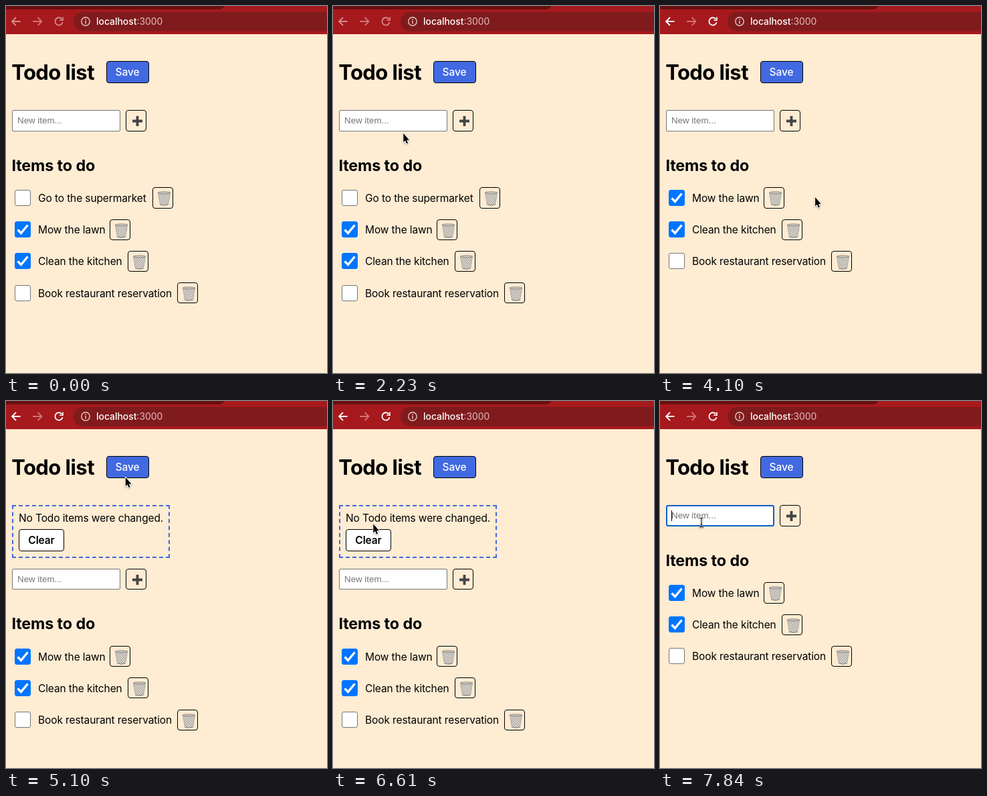
An HTML page that plays this animation: 480x547 px, repeating every 8000 ms.

```html
<!DOCTYPE html>
<html lang="en">
<head>
<meta charset="utf-8">
<title>Todo list</title>
<style>
  html, body { margin: 0; width: 100%; height: 100%; overflow: hidden; background: #feecd3; }
  svg { display: block; width: 480px; height: 547px; }
  text { font: 400 15.5px Inter, "Open Sans", sans-serif; letter-spacing: -.11px; white-space: pre; }
  .h1 { font-size: 31px; font-weight: 700; letter-spacing: -.55px; }
  .h2 { font-size: 23.3px; font-weight: 700; }
  .save { font-weight: 500; fill: #fff; }
  .clear { font-weight: 600; }
  .url { font-size: 13.9px; fill: #dfbcbd; letter-spacing: 0; }
  .host { fill: #fff; font-weight: 500; }
  .hint { font: 13.333px "Liberation Sans", Arial, sans-serif; letter-spacing: 0; fill: #757575; }
  .mid { text-anchor: middle; }
  #cursor { filter: drop-shadow(0 1px 1px rgba(0, 0, 0, .3)); }
</style>
</head>
<body>
<svg viewBox="0 0 480 547">
  <defs>
    <pattern id="mesh" width="3.4" height="3.8" patternUnits="userSpaceOnUse">
      <rect width="4" height="4" fill="#e3ddd3"/>
      <path d="M0 0L3.4 3.8M3.4 0L0 3.8" stroke="#9b9895" stroke-width=".7"/>
    </pattern>
    <g id="bin">
      <path d="M1 2.5L4 20Q10 22.3 16 20L19 2.5Z" fill="url(#mesh)" stroke="#a19e9a" stroke-width=".8"/>
      <path d="M4 20Q10 22.2 16 20" fill="none" stroke="#85817d"/>
      <ellipse cx="10" cy="2.4" rx="9.4" ry="1.5" fill="#cfcac2" stroke="#827f7b" stroke-width=".9"/>
    </g>
    <path id="caret" d="M-3 -7Q0 -7 0 -5Q0 -7 3 -7M0 -5V5M-3 7Q0 7 0 5Q0 7 3 7M-1.5 3H1.5"/>
  </defs>

  <rect width="480" height="547" fill="#feecd3"/>
  <rect width="480" height="42" fill="#a6191d"/>
  <path d="M0 0H326Q325 5 317 5H0Z" fill="#68100f"/>
  <rect x="101" y="9" width="420" height="28.5" rx="14.25" fill="#801b1d"/>
  <g fill="none" stroke-width="1.8">
    <path class="nav" d="M21.5 23H9.5M15 17L9 23L15 29"/>
    <path d="M40 23H53M47.5 17L53.5 23L47.5 29" stroke="#d17375"/>
    <path class="nav" d="M83.6 19.5A5.7 5.7 0 1 0 84.6 24.3"/>
    <path class="nav" d="M85 16.5V21.2H80.2" stroke-width="1.6"/>
    <circle cx="119" cy="23" r="6.2" stroke="#e3c6c7" stroke-width="1.4"/>
    <path d="M119 22V26.4M119 19.3V20.9" stroke="#e3c6c7" stroke-width="1.5"/>
  </g>
  <text class="url" x="135" y="28"><tspan class="host">localhost</tspan>:3000</text>

  <text class="h1" x="8.2" y="110">Todo list</text>
  <g id="page"></g>

  <g id="cursor">
    <path id="arrow" d="M.3 -.8V12.6L3.1 9.9L5 14.6L7.1 13.7L5.2 9.2H9Z" stroke="#fff" stroke-width="1.8" paint-order="stroke" stroke-linejoin="round"/>
    <path id="hand" transform="translate(0 -.8) scale(.93)" d="M-1.5 1Q0 -.9 1.5 1L2.2 6Q3.5 4.9 5 6.3Q6.4 5.4 7.6 6.9Q9.6 6.4 9.9 8.6Q10.3 12 8.4 14.2V16.6H1V15Q-.8 12.7 -3.4 9.8Q-4.3 8.3 -2.6 7.8Q-1.3 7.7 -.2 9.3ZM3 11V14M5 11V14M7 11V14" fill="#fff" stroke="#000" stroke-width="1.2" stroke-linejoin="round"/>
    <g id="beam" fill="none">
      <use href="#caret" stroke="#fff" stroke-width="2.6"/>
      <use href="#caret" stroke="#111" stroke-width="1.1"/>
    </g>
  </g>
</svg>
<script>
const LOOP = 8000, STEP = 58;
const AT = { active: 3100, remove: 3800, message: 4870, clear: 7090, focus: 7780 };
const BLUE = '#4169e1';

// label, x of its delete button, checked
const ITEMS = [
  ['Go to the supermarket', 219, false],
  ['Mow the lawn', 155, true],
  ['Clean the kitchen', 182, true],
  ['Book restaurant reservation', 256, false]
];

const slowDown = p => 1 - (1 - p) ** 2;
// above 1/2π it backs up first and overshoots at the end
const swing = k => p => p - k * Math.sin(2 * Math.PI * p);

const moves = [];
let rest = [470, 505];

function glide(start, end, to, ease = swing(.155)) {
  const from = rest;
  moves.push({ start, end, at: p => from.map((v, i) => v + (to[i] - v) * ease(p)) });
  rest = to;
}

// clockwise around an ellipse, angles counted from the top
function orbit(start, end, [cx, cy], [rx, ry], a0, a1) {
  const at = p => {
    const a = a0 + (a1 - a0) * p;
    return [cx + rx * Math.sin(a), cy - ry * Math.cos(a)];
  };
  moves.push({ start, end, at });
  rest = at(1);
}

glide(1440, 2230, [105, 190.5], slowDown);
glide(2290, 2980, [233, 292], swing(.25));
glide(3280, 3340, [241, 288]);
glide(3400, 3510, [237, 290]);
glide(3750, 3930, [233, 289]);
glide(4100, 4510, [155, 88]);
glide(4750, 5100, [178.5, 114.5]);
orbit(5330, 6080, [125, 190], [121, 124], .6, 7.1);
orbit(6140, 6490, [115, 172], [97, 62], 1, 4.9);
glide(6550, 6610, [60, 184]);
glide(6670, 6910, [52, 205]);
glide(7440, 7700, [62, 181]);

const $ = id => document.getElementById(id);
const page = $('page'), cursor = $('cursor'), shapes = ['arrow', 'hand', 'beam'].map($);
const navs = document.querySelectorAll('.nav');

const rect = (x, y, w, h, fill, stroke, r, line = 1) =>
  `<rect x="${x + line / 2}" y="${y + line / 2}" width="${w - line}" height="${h - line}" rx="${r}" fill="${fill}" stroke="${stroke}" stroke-width="${line}"/>`;
const label = (x, y, str, cls = '') => `<text x="${x}" y="${y}" class="${cls}">${str}</text>`;
const dashes = (d, gap) => `<path d="${d}" stroke="${BLUE}" stroke-width="2" stroke-dasharray="6 ${gap}"/>`;

let buttons, field;

function button(x, y, w, h, fill = 'none') {
  buttons.push([x, y, w, h]);
  return rect(x, y, w, h, fill, '#000', 3.5);
}

function message() {
  return dashes('M9 156H245M9 233H245', 4) + dashes('M10 155V234M244 155V234', 4.43) +
    label(19, 180, 'No Todo items were changed.') +
    button(19, 191, 68, 33, '#fff') + label(53, 213, 'Clear', 'clear mid');
}

function row([str, binX, checked], i, shift) {
  const top = 270.3 + 47.25 * i + shift;
  const [y, box, base, bottom] = [0, 3.65, 21.6, 31.22].map(d => Math.round(top + d));
  const [fill, stroke] = checked ? ['#0075ff', '#0075ff'] : ['#fff', '#767676'];
  buttons.push([13, box, 24, 24]);
  return rect(13, box, 24, 24, fill, stroke, 2.5) +
    (checked ? `<path d="M17.5 ${box + 12.5}L22.5 ${box + 17.5}L32.5 ${box + 5.5}" fill="none" stroke="#fff" stroke-width="3.3"/>` : '') +
    label(48, base, str) +
    button(binX, y, 31, bottom - y) +
    `<use href="#bin" x="${binX + 7.5}" y="${y + 6}"/>`;
}

function drawPage({ removed, open, focused }) {
  buttons = [];
  const dy = open ? 95 : 0, shift = open ? 94.7 : 0, tall = open ? 31 : 32;
  field = [9, 155 + dy, 162, tall];
  let out = button(150, 82, 64, 33, BLUE) + label(181.5, 104, 'Save', 'save mid');
  if (open) out += message();
  out += rect(...field, '#fff', ...(focused ? ['#0b5fc9', 2, 2] : ['#767676', 1.5]));
  out += label(17, 175 + dy, 'New item...', 'hint');
  if (focused) out += '<path d="M17.5 163V179" stroke="#000"/>';
  out += button(179, 155 + dy, 31, tall) +
    `<path d="M189 ${171.5 + dy}H204M196.5 ${164 + dy}v15" stroke="#444" stroke-width="3.8"/>` +
    label(8.4, 246 + Math.floor(shift), 'Items to do', 'h2');
  ITEMS.slice(removed ? 1 : 0).forEach((item, i) => out += row(item, i, shift));
  page.innerHTML = out;
}

// the pointer advances in even steps, the first one right at the start
function pointer(t) {
  const move = moves.filter(m => t >= m.start).pop();
  if (!move) return null;
  const { start, end, at } = move;
  const count = Math.round((end - start) / STEP);
  const step = Math.floor((t - start) / (end - start) * count + .01) + 1;
  return at(Math.min(1, step / (count + 1)));
}

const inside = ([px, py], [x, y, w, h]) => px >= x && px <= x + w && py >= y && py <= y + h - 1;

let shown = '';
function render(t) {
  const state = {
    removed: t >= AT.remove,
    open: t >= AT.message && t < AT.clear,
    focused: t >= AT.focus
  };
  const key = JSON.stringify(state);
  if (key !== shown) {
    drawPage(state);
    shown = key;
  }
  navs.forEach(n => n.setAttribute('stroke', t >= AT.active ? '#fff' : '#d58d8f'));

  const pos = pointer(t);
  cursor.style.display = pos ? '' : 'none';
  if (!pos) return;
  cursor.setAttribute('transform', `translate(${pos})`);
  const kind = buttons.some(b => inside(pos, b)) ? 1 : inside(pos, field) ? 2 : 0;
  shapes.forEach((s, i) => s.style.display = i === kind ? '' : 'none');
}

const began = performance.now();
function tick() {
  render((performance.now() - began) % LOOP);
  requestAnimationFrame(tick);
}
tick();
</script>
</body>
</html>
```
